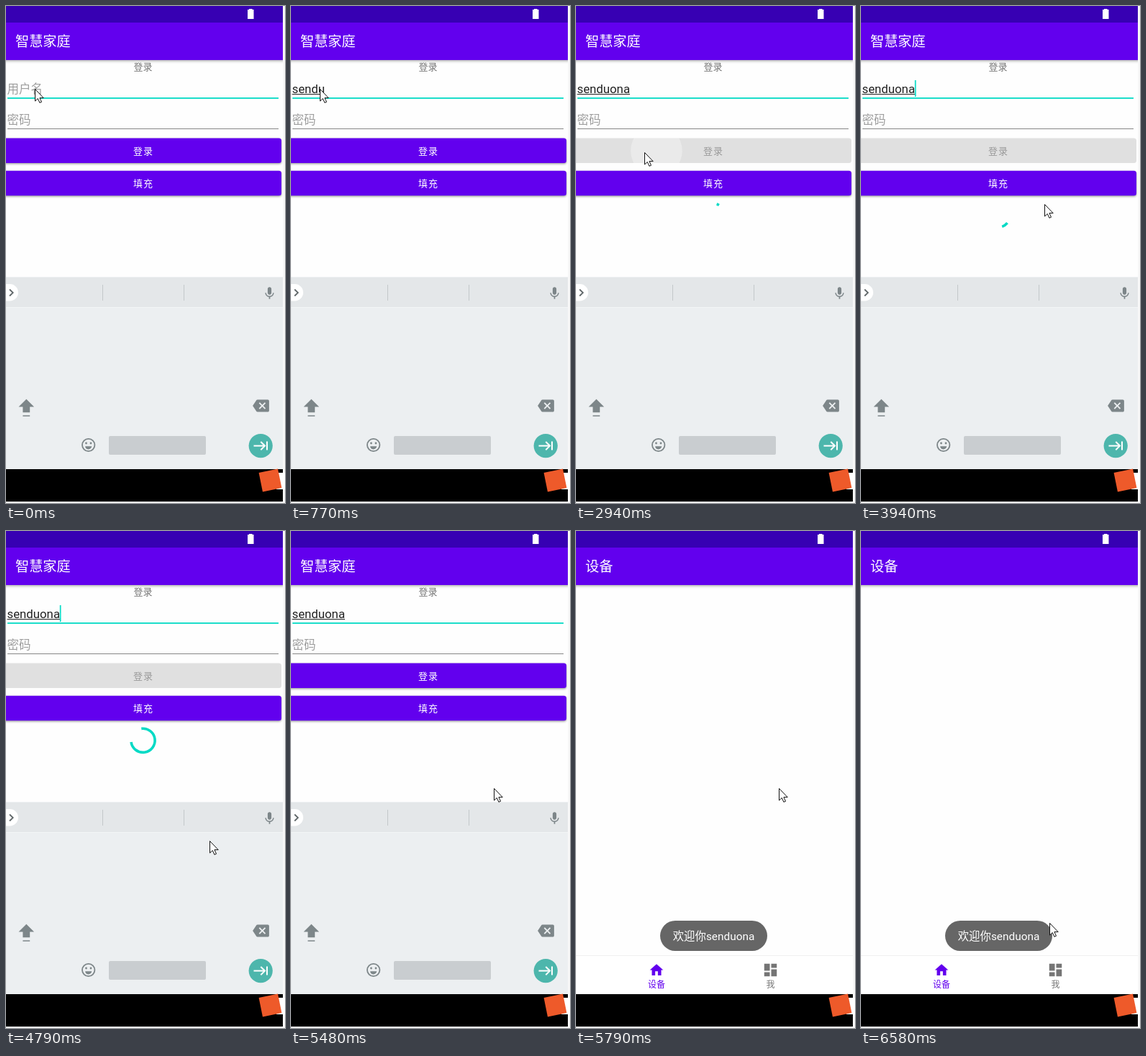
An HTML page with a canvas for the animation above (6650 ms loop, 388 by 690 pixels).

```html
<!DOCTYPE html>
<html lang="zh-CN">
<head>
<meta charset="utf-8">
<title>登录</title>
<style>
html, body { margin: 0; width: 100%; height: 100%; overflow: hidden; background: #f7f7f7; }
canvas { display: block; }
</style>
</head>
<body>
<canvas id="stage" width="388" height="690"></canvas>
<script>
const W = 388, H = 690, LOOP = 6650, STEP = 77;
const PURPLE = '#6200ee', TEAL = '#03dac5', GREY = '#757575', KEY = '#7d8689';
const FONT = 'Roboto, "Noto Sans CJK SC", "Noto Sans CJK", sans-serif';
const USER = 'senduona';
const RIGHT = 385, BOTTOM = 643, MID = 190.5;

const screen = document.getElementById('stage').getContext('2d');
const scratch = document.createElement('canvas');
scratch.width = W;
scratch.height = H;
const layerCtx = scratch.getContext('2d');
let g = screen;

const ICONS = {
  home: new Path2D('M10 20v-6h4v6h5v-8h3L12 3 2 12h3v8z'),
  board: new Path2D('M3 13h8V3H3v10zm0 8h8v-6H3v6zm10 0h8V11h-8v10zm0-18v6h8V3h-8z'),
  mic: new Path2D('M12 14c1.66 0 3-1.34 3-3V5c0-1.66-1.34-3-3-3S9 3.34 9 5v6c0 1.66 1.34 3 3 3zm5.3-3c0 3-2.54 5.1-5.3 5.1S6.7 14 6.7 11H5c0 3.41 2.72 6.23 6 6.72V21h2v-3.28c3.28-.48 6-3.3 6-6.72z'),
  erase: new Path2D('M22 3H7c-.69 0-1.23.35-1.59.88L0 12l5.41 8.11c.36.53.9.89 1.59.89h15c1.1 0 2-.9 2-2V5c0-1.1-.9-2-2-2zm-3 12.59L17.59 17 14 13.41 10.41 17 9 15.59 12.59 12 9 8.41 10.41 7 14 10.59 17.59 7 19 8.41 15.41 12z'),
  shift: new Path2D('M1 13L12 2l11 11h-6v8H7v-8zM7 25h10v1.5H7z'),
  arrow: new Path2D('M0 0V16.5L3.8 13L6.4 18.8L9 17.7L6.4 12.1H11.7Z')
};

// time, x, y of the pointer tip
const POINTER = [
  [2330, 40, 115], [2700, 95, 203], [3100, 95, 203], [3710, 238, 286],
  [3940, 255, 275], [4400, 256, 400], [4760, 283, 434], [5090, 282, 390],
  [5330, 282, 357], [6200, 282, 357], [6400, 273, 450], [6570, 262, 544]
];

const clamp = v => Math.max(0, Math.min(1, v));

// cubic-bezier(.4, 0, .2, 1)
function ease(x) {
  let lo = 0, hi = 1, s = 0.5;
  for (let i = 0; i < 18; i++) {
    s = (lo + hi) / 2;
    const r = 1 - s;
    if (1.2 * r * r * s + 0.6 * r * s * s + s * s * s < x) lo = s; else hi = s;
  }
  return s * s * (3 - 2 * s);
}

function rect(x, y, w, h, color) {
  g.fillStyle = color;
  g.fillRect(x, y, w, h);
}

function round(x, y, w, h, r, color) {
  g.fillStyle = color;
  g.beginPath();
  g.roundRect(x, y, w, h, r);
  g.fill();
}

function disc(x, y, r, color) {
  g.fillStyle = color;
  g.beginPath();
  g.arc(x, y, r, 0, 2 * Math.PI);
  g.fill();
}

function line(points, color, width) {
  g.strokeStyle = color;
  g.lineWidth = width;
  g.beginPath();
  points.forEach(([x, y]) => g.lineTo(x, y));
  g.stroke();
}

function arc(x, y, r, from, to, color, width) {
  g.strokeStyle = color;
  g.lineWidth = width;
  g.beginPath();
  g.arc(x, y, r, from, to);
  g.stroke();
}

function icon(path, x, y, scale, color) {
  g.save();
  g.translate(x, y);
  g.scale(scale, scale);
  g.translate(-12, -12);
  g.fillStyle = color;
  g.fill(path);
  g.restore();
}

// y is the middle of the glyphs
function text(str, x, y, size, color, align = 'left', spacing = 0, stretch = '') {
  g.font = `${stretch} ${size}px ${FONT}`;
  g.letterSpacing = spacing + 'px';
  g.textAlign = align;
  g.fillStyle = color;
  g.fillText(str, x, y + size * 0.37);
  const width = g.measureText(str).width;
  g.letterSpacing = '0px';
  return width;
}

function shadowed(draw, blur, dy) {
  g.save();
  g.shadowColor = 'rgba(0,0,0,.4)';
  g.shadowBlur = blur;
  g.shadowOffsetY = dy;
  draw();
  g.restore();
}

// Draws a whole window, then blends it at one opacity
function layer(draw, alpha, dy) {
  if (alpha <= 0) return;
  layerCtx.clearRect(0, 0, W, H);
  g = layerCtx;
  g.save();
  g.beginPath();
  g.rect(0, 0, RIGHT, BOTTOM);
  g.clip();
  draw();
  g.restore();
  g = screen;
  g.globalAlpha = alpha;
  g.drawImage(scratch, 0, dy);
  g.globalAlpha = 1;
}

function page(title) {
  rect(0, 0, RIGHT, BOTTOM, '#fefefe');
  shadowed(() => rect(-6, 23, RIGHT + 12, 52, PURPLE), 4, 1);
  rect(0, 0, RIGHT, 23, '#3700b3');
  text(title, 13, 49, 19.2, '#fff');
}

function caretOn(t) {
  if (t < 2400) return (t >= 80 && t < 770) || (t >= 1320 && t < 2020);
  return (t - 2400) % 1036 < 510;
}

function typed(t) {
  if (t < 230) return '';
  if (t < 310) return USER.slice(0, 3);
  return t < 1470 ? USER.slice(0, 5) : USER;
}

function button(label, y, enabled) {
  const body = () => round(-3, y, 386, 34.5, 3.5, enabled ? PURPLE : '#e0e0e0');
  if (enabled) shadowed(body, 3, 1.2); else body();
}

function buttonLabel(label, y, color) {
  text(label, MID + 0.5, y, 13, color, 'center', 1);
}

function ripple(t) {
  if (t < 2780 || t >= 3010) return;
  g.save();
  g.beginPath();
  g.roundRect(-3, 183.5, 386, 34.5, 3.5);
  g.clip();
  const p = clamp((t - 2750) / 190);
  disc(95 + 17 * p, 201, 12 + 24 * p, t < 2860 ? 'rgba(255,255,255,.24)' : 'rgba(255,255,255,.3)');
  g.restore();
}

function spinner(t) {
  const turn = (t - 2860) / 1333, f = turn % 1;
  const base = 216 * turn + 90 * f - 90;
  const tail = base + 270 * ease(clamp(2 * f - 1));
  const head = base + 270 * ease(clamp(2 * f));
  const rad = Math.PI / 180;
  arc(MID, 290.8, 16.6, tail * rad, (head + 2) * rad, TEAL, 3.6);
}

function login(t) {
  const busy = t >= 2860 && t < 5400;
  page('智慧家庭');
  text('登录', MID, 84.5, 13, GREY, 'center');

  const name = typed(t);
  let width = 0;
  if (name) {
    width = text(name, 1.5, 115, 16.8, '#212121');
    rect(1.5, 122, width, 1, '#212121');
  } else {
    text('用户名', 1.5, 115, 16.5, '#9e9e9e');
  }
  if (caretOn(t)) rect(1.3 + width, 103, 1.7, 23, TEAL);
  rect(2, 127, 377, 1.8, TEAL);
  text('密码', 1.5, 157.5, 16.5, '#9e9e9e');
  rect(2, 170, 377, 1, '#868686');

  button('登录', 183.5, !busy);
  ripple(t);
  buttonLabel('登录', 201, busy ? '#999' : '#fff');
  button('填充', 228.8, true);
  buttonLabel('填充', 246, '#fff');
  if (busy) spinner(t);
}

function devices() {
  page('设备');
  rect(0, 589, RIGHT, 1, '#f0f0f0');
  rect(0, 590, RIGHT, 53, '#fff');
  icon(ICONS.home, 112, 609.5, 0.93, PURPLE);
  text('设备', 112, 630, 12, PURPLE, 'center');
  icon(ICONS.board, 270.5, 609.5, 0.97, GREY);
  text('我', 270.5, 630, 12, GREY, 'center');
}

function keyboard() {
  rect(0, 376, RIGHT, 267, '#eceff1');
  rect(0, 377, RIGHT, 41, '#e4e7e9');
  rect(0, 418, RIGHT, 1, '#f3f5f6');
  round(-12, 386, 29, 23.5, 11.7, '#fff');
  line([[5, 393.5], [9.7, 398], [5, 402.5]], '#606769', 1.8);
  rect(134, 387, 1, 22, '#c3c8ca');
  rect(247, 387, 1, 22, '#c3c8ca');
  icon(ICONS.mic, 366.5, 399, 0.87, KEY);
  icon(ICONS.shift, 28.3, 555.5, 0.98, KEY);
  icon(ICONS.erase, 354.5, 555, 0.95, KEY);

  arc(114.7, 609.5, 8.7, 0, 2 * Math.PI, KEY, 1.8);
  disc(111.5, 607, 1.4, KEY);
  disc(118, 607, 1.4, KEY);
  g.fillStyle = KEY;
  g.beginPath();
  g.arc(114.7, 610.8, 4.6, 0.1, Math.PI - 0.1);
  g.fill();

  round(143, 597, 135, 26, 2, '#c9cdd0');
  disc(354.2, 610.6, 16.6, '#4db6ac');
  line([[344.5, 610.6], [359.5, 610.6]], '#fff', 2);
  line([[354.3, 605], [360, 610.6], [354.3, 616.2]], '#fff', 2);
  line([[363, 604.6], [363, 616.6]], '#fff', 2);
}

function toast() {
  round(117, 541, 149, 42, 21, '#666');
  text('欢迎你' + USER, 191.5, 562, 15.4, '#fff', 'center', 0, 'condensed');
}

function pointer(t) {
  let i = 0;
  while (i < POINTER.length - 2 && t > POINTER[i + 1][0]) i++;
  const [t0, x0, y0] = POINTER[i], [t1, x1, y1] = POINTER[i + 1];
  const p = clamp((t - t0) / (t1 - t0));
  g.save();
  g.translate(Math.round(x0 + (x1 - x0) * p) + 0.5, Math.round(y0 + (y1 - y0) * p) + 0.5);
  g.fillStyle = '#fff';
  g.fill(ICONS.arrow);
  g.strokeStyle = '#111';
  g.lineWidth = 1;
  g.stroke(ICONS.arrow);
  g.restore();
}

function snap(t) {
  if (t < 2400) return t;
  const start = t < 6270 ? 2400 : 6270;
  return start + Math.floor((t - start) / STEP) * STEP;
}

function render(time) {
  const t = snap(time);
  const open = t - 5503;
  const keys = clamp((t - 5520) / 220);

  rect(0, 0, W, H, '#f7f7f7');
  rect(0, 0, RIGHT, 688, '#000');
  if (open < 300) layer(() => login(t), 1 - 0.2 * clamp(open / 130), 0);
  if (open > 0) {
    const alpha = 1 - (1 - clamp(open / 200)) ** 4;
    layer(devices, alpha, Math.round(53 * (1 - clamp(open / 350)) ** 5));
  }
  layer(keyboard, 1 - keys, Math.round(53 * keys));
  layer(toast, clamp((t - 5557) / 154), 0);

  rect(336, 5, 8.5, 13, '#fff');
  rect(338, 4, 4.5, 1.5, '#fff');
  rect(376, 648, 12, 23, '#fff');
  g.save();
  g.translate(367.5, 658.5);
  g.rotate(-0.2);
  rect(-13.5, -13.5, 27, 27, '#ee5a2a');
  g.restore();
  pointer(t);
}

const begin = performance.now();
function tick() {
  render((performance.now() - begin) % LOOP);
  requestAnimationFrame(tick);
}
tick();
</script>
</body>
</html>
```
